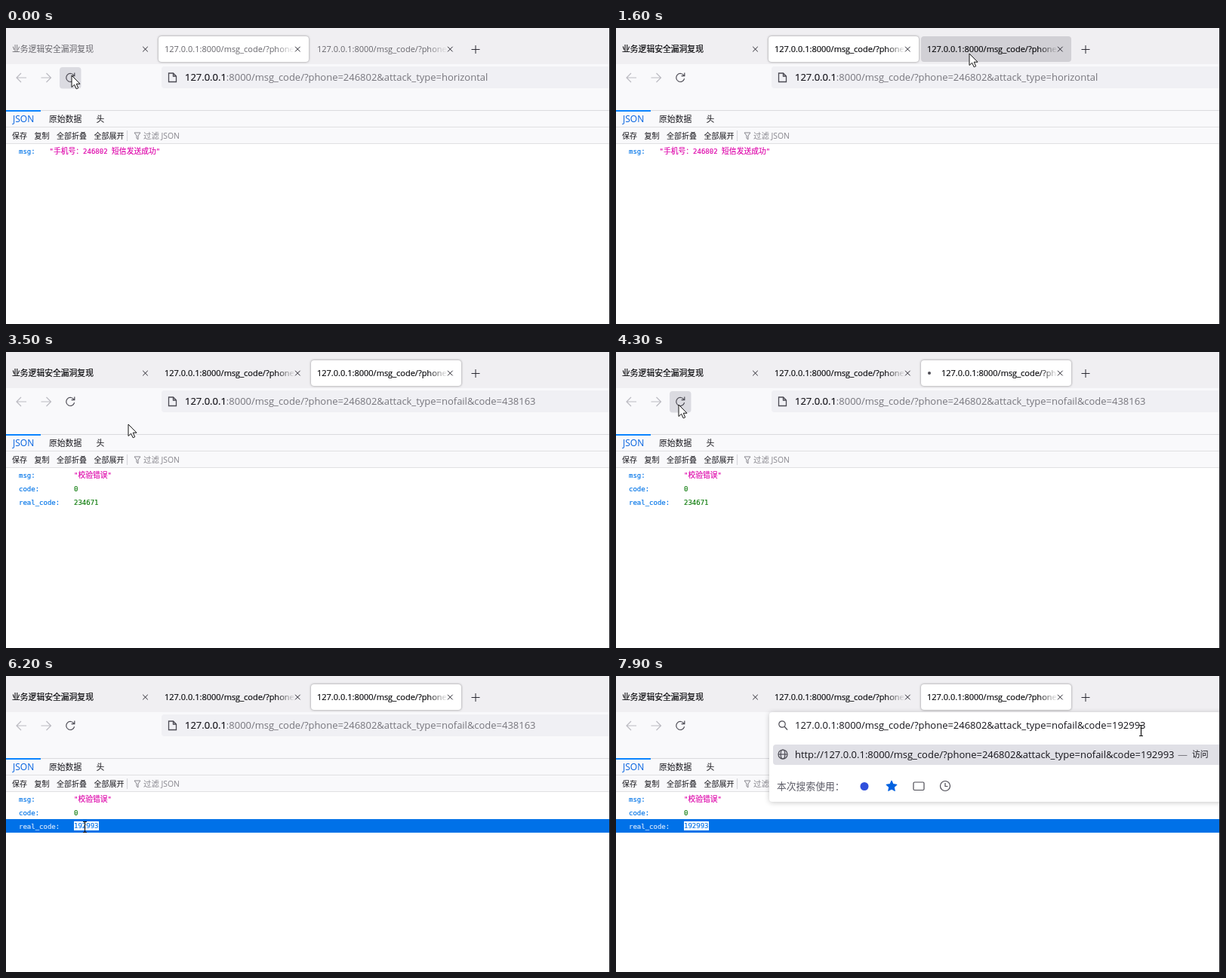
Write an HTML page that moves like this. It is 800 px wide and 393 px high and loops after 8 s.

```html
<!DOCTYPE html>
<html lang="zh">
<head>
<meta charset="utf-8">
<title>JSON viewer</title>
<style>
html, body { margin: 0; width: 100%; height: 100%; overflow: hidden; background: #fff; }
#stage { position: relative; width: 800px; height: 393px; overflow: hidden; background: #fff;
  font: 10.8px/20px "Open Sans", "Noto Sans CJK SC", "Noto Sans CJK", sans-serif; color: #15141a; }
#stage div, #stage svg, p { position: absolute; box-sizing: border-box; }
/* text is placed by its left edge and vertical centre */
p { margin: 0; left: calc(var(--x) * 1px); top: calc(var(--y) * 1px - 10px); white-space: pre; }
svg { left: 0; top: 0; fill: none; stroke: #4c4b54; stroke-width: 1.2; }
.hide { display: none; }

#strip { width: 800px; height: 48px; background: #f0eff2; }
#nav { top: 48px; width: 800px; height: 62px; background: #f9f9fb; border-bottom: 1px solid #dadade; }
.title { color: #0a0a0d; -webkit-text-stroke: .2px; }
.tab { top: 11px; width: 199px; height: 34px; border-radius: 4px; }
.tab p { width: 173px; overflow: hidden; font-size: 11px;
  -webkit-mask: linear-gradient(90deg, #000 85%, transparent); mask: linear-gradient(90deg, #000 85%, transparent); }
.tab.hover { background: #d1d0d5; }
.tab.on { background: #fff; box-shadow: 0 0 3px rgba(0, 0, 0, .45); }
.tab.load p { margin-left: 19px; width: 154px; }
.away .title { color: #66656b; -webkit-text-stroke: 0; }

#bar { left: 206px; top: 51px; width: 610px; height: 29px; border-radius: 4px; background: #f0f0f4; }
#bar.focus { left: 204px; top: 50px; height: 33px; background: #fff; border: 2px solid #0a6be8; }
#url { font-size: 12.97px; color: #77767d; }
#url b { font-weight: 400; color: #15141a; -webkit-text-stroke: .2px; }
#url.focus { color: #15141a; }
#url.all, #url.word i { background: #0078d7; color: #fff; line-height: 18px; }
#url.all b { color: #fff; }
#url i { font-style: normal; }

#page { top: 109px; width: 800px; height: 284px; background: #fff; }
#heads, #tools { width: 800px; background: #f9f9fb; border-bottom: 1px solid #e0e0e2; }
#heads { height: 23px; border-top: 1px solid #dadade; }
#tools { top: 23px; height: 22px; }
#mark { width: 46px; height: 2px; background: #0a84ff; }
#page .small { font-size: 10px; }
.row { left: 0; width: 799px; height: 18px; font: 9px/20px "DejaVu Sans Mono", "Noto Sans CJK SC", "Noto Sans CJK", monospace;
  color: #0074e8; -webkit-text-stroke: .15px; }
.row p { top: -.5px; }
.row.hover { background: #f0f7fd; }
.row.sel { background: #0071e8; color: #d9ebff; }
.str { color: #dd00a9; }
.num { color: #0a7a08; }
.sel .num { background: #fff; color: #0071e8; line-height: 12px; top: 3px; }
.str span { font-size: 9.8px; line-height: 0; }

#pop { left: 203px; top: 48px; width: 620px; height: 119px; border-radius: 4px; background: #fff; box-shadow: 0 1px 7px rgba(0, 0, 0, .22); }
#pop .pick { left: 5px; top: 43px; width: 620px; height: 27px; border-radius: 4px; background: #e0e0e6; }
#pop p { font-size: 12.98px; }
#edge { left: 799px; width: 1px; height: 393px; background: #222226; }
</style>
</head>
<body>
<div id="stage">
  <div id="strip"></div>
  <div id="nav"></div>
  <p class="title" style="--x:8;--y:28">业务逻辑安全漏洞复现</p>
  <div class="tab" id="tabA" style="left:202px"><p class="title" style="--x:8;--y:17">127.0.0.1:8000/msg_code/?phone=</p></div>
  <div class="tab" id="tabB" style="left:404px"><p class="title" style="--x:8;--y:17">127.0.0.1:8000/msg_code/?phone=</p></div>
  <div id="bar"></div>
  <p id="url" style="--x:237;--y:65"></p>

  <div id="page">
    <div id="heads"></div>
    <div id="tools"></div>
    <div id="mark"></div>
    <p style="--x:9;--y:12;color:#0060df;font-size:12px">JSON</p>
    <p style="--x:57;--y:12">原始数据</p>
    <p style="--x:119.5;--y:12">头</p>
    <p class="small" style="--x:8;--y:33.5">保存</p>
    <p class="small" style="--x:37.5;--y:33.5">复制</p>
    <p class="small" style="--x:67;--y:33.5">全部折叠</p>
    <p class="small" style="--x:116.5;--y:33.5">全部展开</p>
    <p style="--x:182;--y:33.5;color:#85848b;font-size:10.4px">过滤 JSON</p>
    <svg width="240" height="46">
      <path d="M160.5 27v14" stroke="#d7d7db"/>
      <path d="M170 30h8l-3 4v5l-2-1.5v-3.5z" stroke="#85848b" stroke-width="1"/>
    </svg>
    <div class="row" style="top:45px"><p style="--x:17">msg:</p><p class="str" id="msg"></p></div>
    <div class="row" style="top:63px"><p style="--x:17">code:</p><p class="num" style="--x:90">0</p></div>
    <div class="row" style="top:81px"><p style="--x:17">real_code:</p><p class="num" id="real" style="--x:90"></p></div>
  </div>

  <svg width="800" height="110">
    <rect id="press" x="71" y="52" width="28.5" height="28.5" rx="4" fill="#dbdbe1" stroke="none"/>
    <g stroke="#bcbbc2">
      <path d="M27 66H14.5M20 60l-6 6 6 6"/>
      <path d="M46.5 66H59M53.5 60l6 6-6 6"/>
    </g>
    <path d="M90 63.2a5.5 5.5 0 1 0 .6 4M90.8 59.5v4.2h-4.2"/>
    <path d="M215.5 60h6l4 4v7.5h-10zM221.5 60v4h4" stroke-width="1.3"/>
    <g stroke="#2b2a33" stroke-width="1">
      <path d="M181.2 24.8l6.6 6.6m0-6.6l-6.6 6.6M383 24.8l6.6 6.6m0-6.6l-6.6 6.6M585 24.8l6.6 6.6m0-6.6l-6.6 6.6"/>
      <path d="M616.5 28.5h11M622 23v11"/>
    </g>
    <circle id="dot" cy="28" r="2" fill="#4c4b54" stroke="none"/>
  </svg>

  <div id="pop">
    <div class="pick"></div>
    <p style="--x:34;--y:17" id="typed"></p>
    <p style="--x:34;--y:56" id="hint"></p>
    <p style="--x:541;--y:56;color:#77767d">—</p>
    <p style="--x:560;--y:56;font-size:10.8px">访问</p>
    <p style="--x:10;--y:98;font-size:12.8px;color:#5b5b66">本次搜索使用：</p>
    <svg width="260" height="120">
      <circle cx="17" cy="16" r="4.2"/><path d="M20 19l4 4.5"/>
      <circle cx="18" cy="56" r="6"/><ellipse cx="18" cy="56" rx="2.8" ry="6"/><path d="M12 56h12"/>
      <circle cx="126" cy="98.5" r="5.5" fill="#2f4fdc" stroke="none"/>
      <path id="star" fill="#0061e0" stroke="#0061e0" stroke-linejoin="round"/>
      <rect x="191" y="93" width="14" height="10.5" rx="1.5"/>
      <circle cx="233" cy="98" r="6.5"/><path d="M233 94v4.5h3.5"/>
    </svg>
  </div>

  <div id="edge"></div>
  <svg id="mouse" width="24" height="28" overflow="visible">
    <path id="arrow" d="M0 0v15.5l3.6-3.3 2.6 5.6 2.5-1.1-2.5-5.5h4.8z" fill="#fff" stroke="#111" stroke-width="1"/>
    <path id="beam" d="M-2-6.500h5M-2 7.500h5M.5-6V7" stroke="#111"/>
  </svg>
</div>

<script>
const $ = id => document.getElementById(id);
const rows = [...document.querySelectorAll('.row')];
const LOOP = 8000, STEP = 100, PHONE = '246802';
const HOST = '127.0.0.1', PATH = `:8000/msg_code/?phone=${PHONE}&attack_type=`;

// pointer stops: time, x, y
const path = [
  [0, 87, 63], [500, 87, 63], [700, 150, 60], [900, 267, 47], [1000, 390, 25],
  [1100, 390, 25], [1200, 430, 28], [1600, 468, 34], [2100, 468, 34], [2400, 455, 255],
  [2700, 443, 160], [2900, 440, 138], [3000, 440, 138], [3200, 492, 106], [3600, 52, 92],
  [3800, 52, 92], [4000, 83, 70], [4500, 83, 70], [4800, 240, 76], [5000, 560, 90],
  [5200, 642, 85], [5600, 180, 184], [6000, 104, 200], [6300, 104, 200], [6500, 160, 190],
  [7000, 690, 76], [7100, 695, 72], [LOOP, 695, 72]
];

const star = Array.from({ length: 10 }, (_, i) => {
  const r = i % 2 ? 3.4 : 7.2, a = i * Math.PI / 5;
  return (162 + r * Math.sin(a)).toFixed(1) + ' ' + (98.5 - r * Math.cos(a)).toFixed(1);
});
$('star').setAttribute('d', 'M' + star.join('L') + 'z');

function pointer(t) {
  const i = path.findIndex(p => p[0] > t);
  const [t0, x0, y0] = path[i - 1], [t1, x1, y1] = path[i];
  const k = (t - t0) / (t1 - t0);
  return [x0 + (x1 - x0) * k, y0 + (y1 - y0) * k];
}

const flag = (el, name, on) => el.classList.toggle(name, on);
const show = (id, on) => $(id).style.display = on ? '' : 'none';
const within = (t, a, b) => t >= a && t < b;
function write(id, html) {
  const el = $(id);
  if (el.memo !== html) el.innerHTML = el.memo = html;
}

const full = HOST + PATH + 'nofail&code=192993';
$('typed').textContent = full;
$('hint').textContent = 'http://' + full;

function draw(t) {
  const [x, y] = pointer(t);
  const second = t >= 1800, picked = t >= 6200, focus = t >= 7300;
  const loadA = within(t, 200, 600), loadB = within(t, 4200, 4600);

  flag($('stage'), 'away', t < 100);
  flag($('tabA'), 'on', !second);
  flag($('tabB'), 'on', second);
  flag($('tabA'), 'load', loadA);
  flag($('tabB'), 'load', loadB);
  flag($('tabB'), 'hover', !second && x > 404 && x < 603 && y > 11 && y < 45);
  show('dot', loadA || loadB);
  $('dot').setAttribute('cx', (second ? 419 : 217) - 4 * Math.cos((t - 4300) / 200 * Math.PI));
  show('press', x > 71 && x < 99 && y > 52 && y < 81);

  flag($('bar'), 'focus', focus);
  flag($('url'), 'focus', focus);
  flag($('url'), 'all', within(t, 7300, 7400));
  flag($('url'), 'word', t >= 7400);
  write('url', `<b>${HOST}</b>` + (PATH + (second ? 'nofail&code=' : 'horizontal')).replaceAll('&', '&amp;') + (second ? '<i>438163</i>' : ''));

  show('page', !within(t, 4400, 4500));
  write('msg', second ? '"<span>校验错误</span>"' : `"<span>手机号：</span>${PHONE} <span>短信发送成功</span>"`);
  $('msg').style.setProperty('--x', second ? 90 : 57.5);
  write('real', t < 4500 ? '234671' : '192993');
  rows.forEach((row, i) => {
    const top = 154 + i * 18;
    flag(row, 'hide', i > 0 && !second);
    flag(row, 'hover', y >= top && y < top + 18);
    flag(row, 'sel', i === 2 && picked);
  });

  show('pop', t >= 7800);
  const text = y > 153 || (x > 206 && y > 51 && y < 88);
  show('arrow', !text);
  show('beam', text);
  $('mouse').style.transform = `translate(${Math.round(x)}px, ${Math.round(y)}px)`;
}

const start = performance.now();
function tick() {
  const t = (performance.now() - start) % LOOP;
  draw(Math.floor(t / STEP) * STEP);
  requestAnimationFrame(tick);
}
tick();
</script>
</body>
</html>
```
